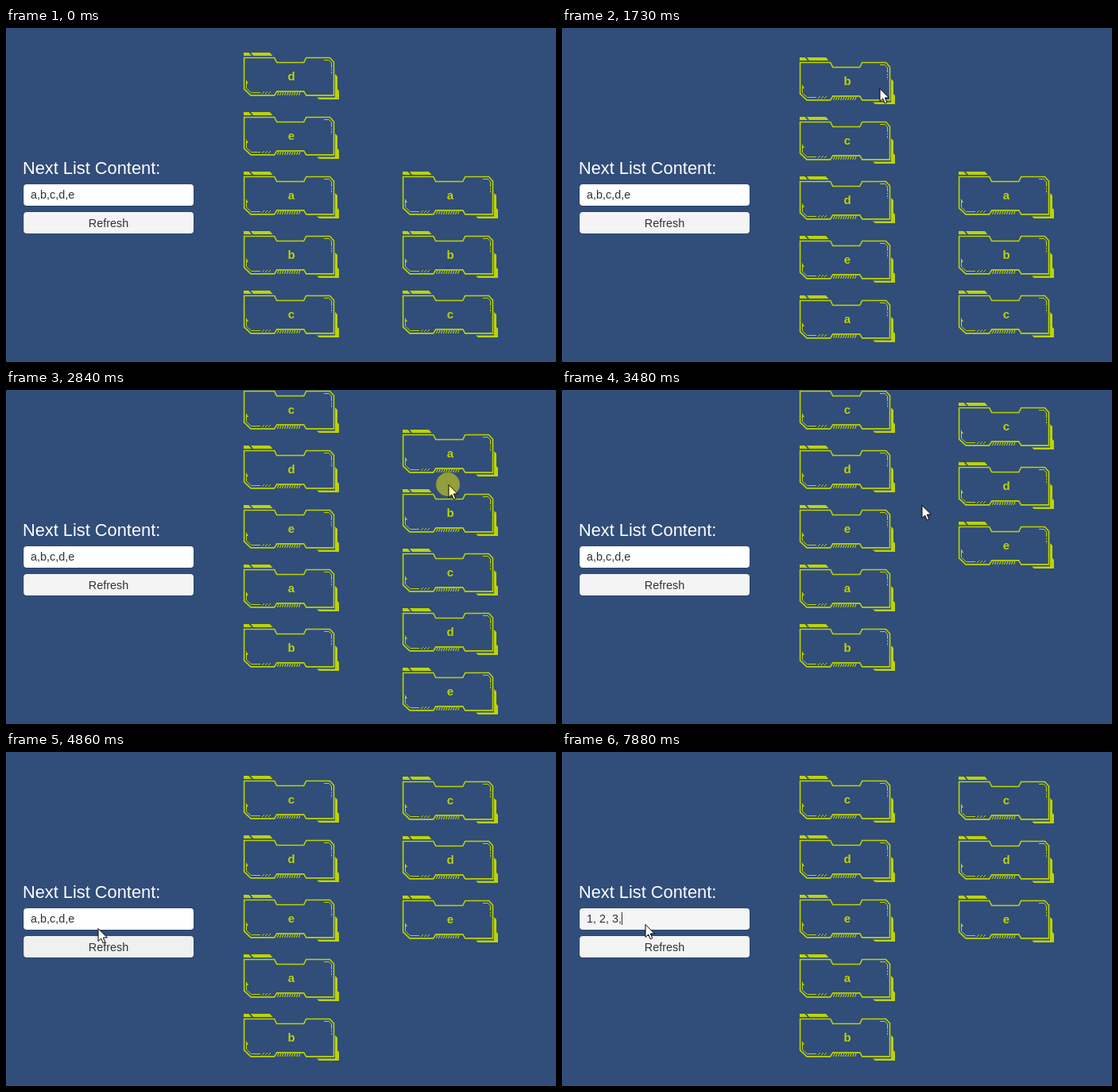
Recreate the animation shown at these times as an HTML page with a canvas. Size 692 by 421 pixels, loop 8000 ms.

```html
<!DOCTYPE html>
<html lang="en">
<head>
<meta charset="utf-8">
<title>Scrolling lists</title>
<style>
  html, body { margin: 0; width: 100%; height: 100%; overflow: hidden; background: #314d79; }
  canvas { display: block; }
</style>
</head>
<body>
<canvas id="stage" width="692" height="421"></canvas>
<script>
const ctx = document.getElementById('stage').getContext('2d');
const LOOP = 8000, STEP = 69.4, START = 200, SNAP = 3490;
const GAP = 75, TOP = 23.5, SPAN = 5 * GAP;
const LIME = '#bcd400', INK = '#323232';
const FONT = '"Liberation Sans", Arial, sans-serif';
const CLICK = 5060, TYPE = 6690, KEY = 170;

// Each list follows the pointer, glides to rest, then snaps home
const lists = [
  { x: 359, wrap: true, grab: 273, press: 930, release: 1690, coast: 720, rest: -336, home: -301 },
  { x: 559, wrap: false, grab: 250, press: 2530, release: 2976, coast: 345, rest: -315, home: -300 }
];

// Pointer turning points: time, x, y
const pointer = [
  [200, 403, 398], [965, 388, 288], [1241, 376, 170], [1690, 391, 67], [2420, 556, 250],
  [2600, 556, 250], [2976, 556, 42], [3440, 452, 145], [3540, 452, 145], [3720, 340, 180],
  [4580, 340, 180], [4845, 115, 222], [5000, 104, 217]
];

function pointerAt(t) {
  const n = pointer.findIndex(k => k[0] > t);
  const [t0, x0, y0] = pointer.at(n < 0 ? -1 : Math.max(0, n - 1));
  if (n < 1) return [x0, y0];
  const [t1, x1, y1] = pointer[n], p = (t - t0) / (t1 - t0);
  return [x0 + (x1 - x0) * p, y0 + (y1 - y0) * p];
}

function easeOut(t, duration, from, to, power) {
  const p = Math.min(1, Math.max(0, t / duration));
  return from + (to - from) * (1 - (1 - p) ** power);
}

function offsetOf(list, t) {
  const drag = at => Math.min(0, pointerAt(at)[1] - list.grab);
  if (t < list.press) return 0;
  if (t < list.release) return drag(t);
  if (t < SNAP) return easeOut(t - list.release, list.coast, drag(list.release), list.rest, 2);
  return easeOut(t - SNAP, 640, list.rest, list.home, 3);
}

function poly(...p) {
  ctx.beginPath();
  for (let i = 0; i < p.length; i += 2) ctx.lineTo(p[i], p[i + 1]);
}
function fill(...p) { poly(...p); ctx.closePath(); ctx.fill(); }
function line(...p) { poly(...p); ctx.stroke(); }

function text(str, x, y, font, color, align = 'left') {
  ctx.font = font + ' ' + FONT;
  ctx.fillStyle = color;
  ctx.textAlign = align;
  ctx.fillText(str, x, y);
}

function plate(x, y, label) {
  const left = .6, top = 6.5, right = 113.5, bottom = 53.9, mid = 58.7;
  const notch = (edge, depth, dir) =>
    [-20, -17, 17, 20].flatMap((d, i) => [mid + d * dir, edge + (i % 3 ? depth : 0)]);
  const bar = (from, to, lean) => fill(from, 0, to, 0, to + 3.5, 4, from + lean, 4);

  ctx.save();
  ctx.translate(x - 60, y - 30);
  ctx.fillStyle = ctx.strokeStyle = LIME;
  bar(0, 6.5, 0);
  bar(9, 33, 3);
  fill(115, 27, 118, 30, 118, 46, 120, 48, 120, 59, 95, 59, 92, 56.5, 115, 56.5);

  ctx.lineWidth = 1.6;
  poly(left, top, ...notch(top, 6, 1), right - 5, top, right, top + 5.5,
    right, bottom, ...notch(bottom, -5, -1), 9, bottom, left, bottom - 8);
  ctx.closePath();
  ctx.stroke();

  ctx.lineWidth = 1.2;
  for (let i = 0; i < 10; i++) line(42.5 + i * 3, bottom, 44 + i * 3, bottom - 4);

  ctx.lineWidth = 1;
  fill(3, 34, 6, 39, 3, 39);
  line(3.5, 38, 3.5, 45, 9.5, 50.5, 21, 50.5);
  for (let i = 0; i < 3; i++) line(23 + i * 4, 52, 26 + i * 4, 49);
  line(101, 9.5, 107.5, 9.5, 110.5, 13, 110.5, 19);
  ctx.setLineDash([2, 1.5]);
  line(110.5, 20.5, 110.5, 28);
  ctx.restore();
  text(label, x, y + 5, 'bold 15px', LIME, 'center');
}

function drawList(list, t) {
  const offset = Math.round(offsetOf(list, t));
  [...'abcde'].forEach((label, i) => {
    let y = 211 + GAP * i + offset;
    if (list.wrap && y < TOP) y += SPAN;
    if (list.wrap && y > TOP + SPAN) y -= SPAN;
    if (y > TOP && y < TOP + SPAN) plate(list.x, y, label);
  });
}

function field(y, color) {
  ctx.fillStyle = 'rgba(20,30,50,.25)';
  ctx.beginPath();
  ctx.roundRect(21.5, y - .3, 215, 28, 4.5);
  ctx.fill();
  ctx.fillStyle = color;
  ctx.beginPath();
  ctx.roundRect(22.2, y, 213.8, 27, 4);
  ctx.fill();
}

function form(t, s) {
  const onInput = s > 4950, onButton = s > 4780 && !onInput;
  text('Next List Content:', 21, 183.5, '21.8px', '#fff');
  field(197, onInput ? '#f5f5f5' : '#fff');
  field(232, onButton ? '#f0f0f0' : '#f4f4f4');

  const typing = t >= TYPE;
  if (!typing && s >= CLICK) {
    ctx.fillStyle = 'rgba(168,206,255,.75)';
    ctx.fillRect(31, 202, 55, 16);
  }
  const value = typing ? '1, 2, 3,'.slice(0, 1 + Math.floor((t - TYPE) / KEY)) : 'a,b,c,d,e';
  text(value, 31, 215, '14.4px', INK);
  if (typing) ctx.fillRect(Math.round(31 + ctx.measureText(value).width), 202, 1, 16);
  text('Refresh', 129, 250.5, '14.4px', INK, 'center');
}

function cursor(t) {
  if (t < START) return;
  const [x, y] = pointerAt(t).map(Math.round);
  const down = lists.some(l => t >= l.press && t < l.release) || (t >= CLICK && t < CLICK + 130);
  if (down) {
    ctx.fillStyle = 'rgba(245,240,0,.5)';
    ctx.beginPath();
    ctx.arc(x, y, 15, 0, Math.PI * 2);
    ctx.fill();
  }
  ctx.save();
  ctx.translate(x + 1, y + .5);
  ctx.fillStyle = down ? '#ffffa0' : '#fff';
  ctx.strokeStyle = '#000';
  ctx.lineWidth = 1;
  poly(0, 0, 0, 16, 3.7, 12.5, 6.2, 18.3, 8.8, 17.2, 6.3, 11.5, 11.4, 11.4);
  ctx.closePath();
  ctx.fill();
  ctx.stroke();
  ctx.restore();
}

function draw(t) {
  // Motion advances in even steps, like a screen recording
  const s = t < START ? 0 : START + STEP * Math.floor((t - START) / STEP + .02);
  ctx.fillStyle = '#314d79';
  ctx.fillRect(0, 0, 692, 421);
  lists.forEach(list => drawList(list, s));
  form(t, s);
  cursor(s);
}

const begin = performance.now();
function tick() {
  draw((performance.now() - begin) % LOOP);
  requestAnimationFrame(tick);
}
tick();
</script>
</body>
</html>
```
